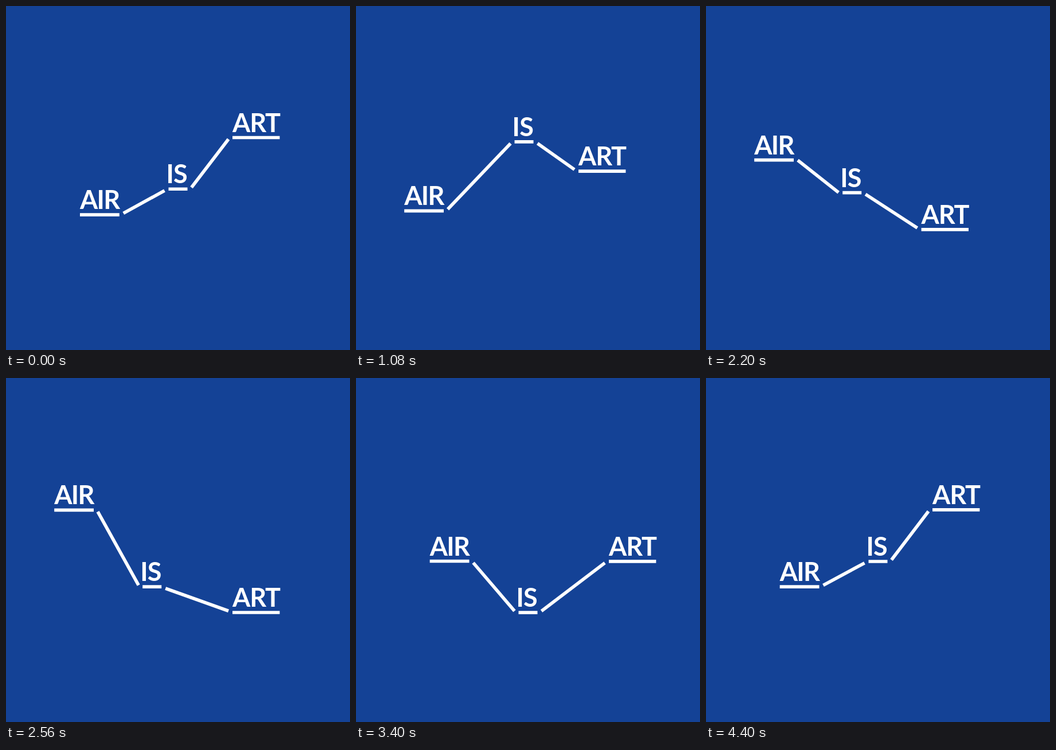
An HTML page for the animation above (5000 ms loop, 600 by 600 pixels).

```html
<!DOCTYPE html>
<html lang="en">
<head>
<meta charset="utf-8">
<title>Air is art</title>
<style>
  html, body { margin: 0; width: 100%; height: 100%; overflow: hidden; background: #144296; }
  svg { display: block; width: 100%; height: 100%; }
  text { font: 700 45px Lato, "Open Sans", sans-serif; fill: #fff; }
  line { stroke: #fff; stroke-width: 5.7; }
</style>
</head>
<body>
<svg id="stage" viewBox="0 0 600 600"></svg>
<script>
const LOOP = 5000, MOVE = 400, GAP = 7, INSET = 2.75, BASELINE = -10;

// Each glyph x is relative to the left end of the word's underline.
const words = [
  { text: "AIR", width: 68.8, glyphs: [0, 29.6, 41.2] },
  { text: "IS", width: 33, glyphs: [-4, 8.6] },
  { text: "ART", width: 82.4, glyphs: [0, 30.2, 57] }
];

// Left end and height of the three underlines in every pose.
const poses = [
  [[129, 364.2], [283.5, 319.3], [395, 229.5]],
  [[84.2, 364.2], [283.5, 230.2], [395, 274.2]],
  [[84.2, 319.5], [238.2, 274.2], [349.7, 364.3]],
  [[84.2, 230.3], [238.2, 364.2], [395, 409]],
  [[128.7, 319.5], [283.5, 409.2], [441, 319.8]],
  [[128.7, 364.2], [283.5, 320], [395, 229.8]]
];
const starts = [-4, 982, 1982, 2982, 3982];

const stage = document.getElementById("stage");
function add(tag, parent) {
  return parent.appendChild(document.createElementNS("http://www.w3.org/2000/svg", tag));
}
function set(node, attrs) {
  for (const key in attrs) node.setAttribute(key, attrs[key]);
}

const groups = words.map(({ text, width, glyphs }) => {
  const group = add("g", stage);
  const label = add("text", group);
  label.textContent = text;
  set(label, { x: glyphs.join(" "), y: BASELINE });
  set(add("line", group), { x1: 0, x2: width, y1: 0, y2: 0 });
  return group;
});
const links = [add("line", stage), add("line", stage)];

const mix = (a, b, p) => a + (b - a) * p;

// Solves the cubic-bezier(1/3, 0, 2/3, 1) curve for a time x.
function ease(x) {
  let low = 0, high = 1;
  for (let i = 0; i < 24; i++) {
    const s = (low + high) / 2, r = 1 - s;
    if (s * r * r + 2 * s * s * r + s ** 3 < x) low = s; else high = s;
  }
  return low * low * (3 - 2 * low);
}

function linkEnds(pose, i) {
  const [x1, y1] = pose[i], [x2, y2] = pose[i + 1];
  const inset = INSET * Math.sign(y2 - y1);
  return [x1 + words[i].width + GAP, y1 + inset, x2 - GAP, y2 - inset];
}

function draw(time) {
  const t = time % LOOP;
  const step = Math.max(0, starts.filter(start => t >= start).length - 1);
  const p = ease(Math.min(1, (t - starts[step]) / MOVE));
  const from = poses[step], to = poses[step + 1];
  groups.forEach((group, i) => {
    const [x, y] = from[i].map((v, k) => mix(v, to[i][k], p));
    set(group, { transform: `translate(${x} ${y})` });
  });
  links.forEach((link, i) => {
    const end = linkEnds(to, i);
    const [x1, y1, x2, y2] = linkEnds(from, i).map((v, k) => mix(v, end[k], p));
    set(link, { x1, y1, x2, y2 });
  });
}

const origin = performance.now();
function tick() {
  draw(performance.now() - origin);
  requestAnimationFrame(tick);
}
tick();
</script>
</body>
</html>
```
